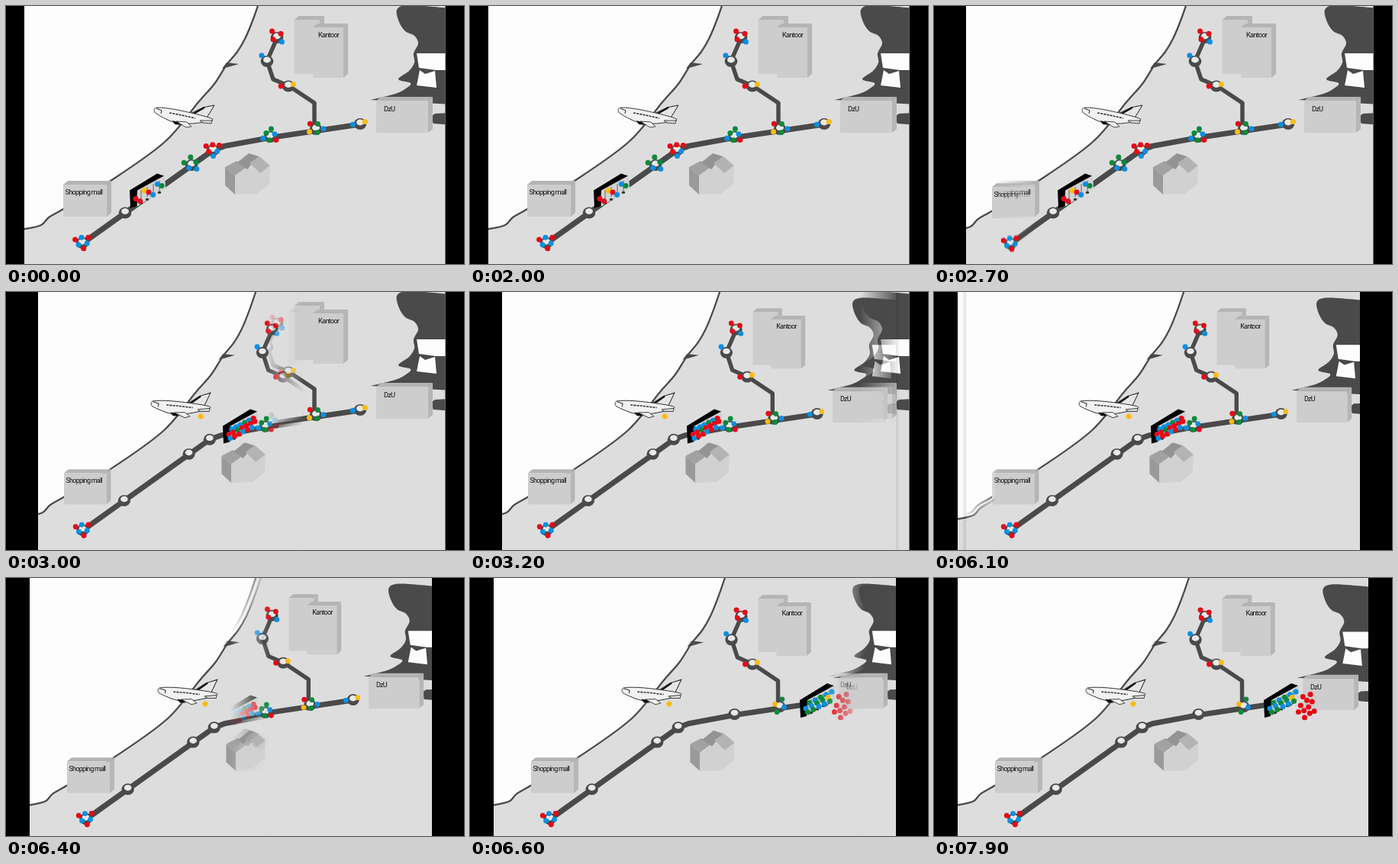
Animation of 600x338 px, one loop 8 s. Source, as an HTML page with a canvas:

```html
<!DOCTYPE html>
<html lang="nl">
<head>
<meta charset="utf-8">
<title>Tram map</title>
<style>
html, body { margin: 0; width: 100%; height: 100%; overflow: hidden; background: #000; }
canvas { display: block; width: 100%; height: 100%; }
</style>
</head>
<body>
<canvas id="stage" width="600" height="338"></canvas>
<script>
const W = 600, H = 338, LOOP = 8000, STEP = 100;
const DARK = '#4a4a4a', LAND = '#dddddd', SEA = '#fdfdfd';
const COLORS = { r: '#e30b17', b: '#0a90e0', g: '#0b8a3a', y: '#fcbc0c' };
const stage = document.getElementById('stage').getContext('2d');

function layer() {
  const c = document.createElement('canvas');
  c.width = W;
  c.height = H;
  return c.getContext('2d');
}

// "x,y x,y ..." to a list of points
const points = s => s.split(' ').map(p => p.split(',').map(Number));

function trace(g, s) {
  g.beginPath();
  points(s).forEach(([x, y]) => g.lineTo(x, y));
}

// Smooth curve through every point
function curve(g, s) {
  const p = points(s);
  const at = i => p[Math.max(0, Math.min(p.length - 1, i))];
  const slope = (i, k) => (at(i + 1)[k] - at(i - 1)[k]) / 6;
  g.beginPath();
  g.moveTo(...p[0]);
  for (let i = 1; i < p.length; i++) {
    const a = p[i - 1], b = p[i];
    g.bezierCurveTo(
      a[0] + slope(i - 1, 0), a[1] + slope(i - 1, 1),
      b[0] - slope(i, 0), b[1] - slope(i, 1), ...b);
  }
}

function fill(g, color) {
  g.fillStyle = color;
  g.fill();
}

function line(g, width, color = DARK) {
  g.strokeStyle = color;
  g.lineWidth = width;
  g.stroke();
}

function poly(g, s, color) {
  trace(g, s);
  g.closePath();
  fill(g, color);
}

function stroke(g, s, width, color) {
  trace(g, s);
  line(g, width, color);
}

function ellipse(g, x, y, rx, ry, color) {
  g.beginPath();
  g.ellipse(x, y, rx, ry, 0, 0, 7);
  fill(g, color);
}

const dot = (g, x, y, key) => ellipse(g, x, y, 3.5, 3.5, COLORS[key]);

// Passengers around a stop, alternately farther out and closer in
function waiting(g, x, y, keys, turn) {
  [...keys].forEach((key, i) => {
    const a = (turn + 360 * i / keys.length) * Math.PI / 180;
    const r = i % 2 ? 6.5 : 10;
    dot(g, x + r * Math.cos(a), y + r * Math.sin(a) * 0.9, key);
  });
}

// Passengers in three rows along the slanted side of the tram
function riding(g, keys) {
  [...keys].forEach((key, i) => {
    const x = 8 + 34 * i / (keys.length - 1);
    dot(g, x, 15 - x / 2 + [0, 6, -5][i % 3], key);
  });
}

// Passengers who have left the tram, spread as a sunflower
function crowd(g, x, y, count) {
  for (let i = 0; i < count; i++) {
    const r = Math.sqrt(i + 0.5), a = i * 2.4;
    dot(g, x + 3.7 * r * Math.cos(a), y + 5.6 * r * Math.sin(a), 'r');
  }
}

function box(g, x, y, w, h, d = 6) {
  const r = x + w, b = y + h, top = y - d + 1;
  poly(g, `${x},${y} ${x + d},${top} ${r + d},${top} ${r},${y}`, '#b4b4b4');
  poly(g, `${r},${y} ${r + d},${top} ${r + d},${b - d + 1} ${r},${b}`, '#b6b6b6');
  g.fillStyle = '#cdcdcd';
  g.fillRect(x, y, w, h);
}

function label(g, text, x, y) {
  g.font = '9.3px Roboto, "Open Sans", sans-serif';
  g.letterSpacing = '-0.8px';
  g.fillStyle = '#111';
  g.fillText(text, x, y);
}

function coast(g) {
  const shore = '-10,296 25,292 46,287 56,277 75,266 137,229 208,178 252,126 273,102 289,77 303,60 314,41 325,14 336,-18';
  g.fillStyle = LAND;
  g.fillRect(-30, -30, 700, 430);
  curve(g, shore);
  g.lineTo(-40, -18);
  g.lineTo(-40, 296);
  fill(g, SEA);
  curve(g, shore);
  line(g, 2.3);
  poly(g, '289,74 305,76 291,80 283,82', DARK);
}

function lake(g) {
  curve(g, '600,5 560,1 525,-1 512,5 515,21 523,33 535,39 540,49 534,62 535,74 528,85 514,96 530,101 524,108 510,115 478,123');
  g.lineTo(600, 130);
  fill(g, DARK);
  poly(g, '538,62 600,62 600,84 563,84 541,81', SEA);
  poly(g, '542,84 549,89 562,85 564,107 538,104', SEA);
  poly(g, '555,146 562,141 600,139 600,157 560,154', DARK);
}

function houses(g) {
  poly(g, '287,211 300,222 300,247 287,235', '#9a9a9a');
  poly(g, '287,211 302,203 315,212 300,222', '#a2a2a2');
  poly(g, '300,222 315,211 346,208 345,233 329,246 300,247', '#d1d1d1');
  poly(g, '303,205 318,193 331,197 316,214', '#939393');
  poly(g, '319,206 332,197 346,209 333,219', '#b3b3b3');
}

const STOPS = points('100,309 156,269.5 243,207 271,187.5 346,170 406,160 464,153 370,103.5 342,71 355,40');

function rails(g) {
  g.lineJoin = 'round';
  stroke(g, '355,42 342,72 350,96 371,105 404,127 404,160', 5.5);
  stroke(g, '100,311 243,209 271,189 286,183.5 346,172.5 464,155', 7.2);
  STOPS.forEach(([x, y]) => {
    ellipse(g, x, y + 1.5, 8.3, 7.6, DARK);
    ellipse(g, x, y - 0.5, 4.9, 3.9, '#e9e9e9');
  });
}

function plane(g, [x, y, turn]) {
  const part = (s, color, width) => {
    poly(g, s, color);
    line(g, width, '#222');
  };
  g.save();
  g.translate(x, y);
  g.rotate(turn);
  part('48,4 64,-4 79,-7 68,11', '#e6e6e6', 1);
  stroke(g, '50,5 66,-4', 2.2, '#111');
  curve(g, '0,-1 5,-4 30,-1 68,8 76,13 48,17 25,15 3,4 0,-1');
  fill(g, '#f1f1f1');
  line(g, 0.9, '#222');
  g.setLineDash([3, 1.2]);
  stroke(g, '20,3 36,6 54,10', 1.6, '#333');
  g.setLineDash([]);
  stroke(g, '3,-3 10,0 9,4', 1, '#222');
  part('60,13 76,13 75,17 64,16', '#ddd', 0.8);
  part('29,14 43,15 49,21 42,22', '#eee', 0.8);
  poly(g, '24,13 31,15 35,19 27,18', '#111');
  g.restore();
}

// Local origin is the upper front corner of the tram
function tram(g, [x, y], riders) {
  g.save();
  g.translate(x, y);
  poly(g, '10,0 46,-19 47,-2 10,21', '#d2d2d2');
  for (let u = 15; u < 45; u += 8) {
    stroke(g, `${u},${7 - u / 2} ${u},${20 - u / 2}`, 1, '#666');
    ellipse(g, u, 25 - u * 0.57, 2.2, 1.7, '#333');
  }
  poly(g, '0,0 36,-22 45,-19 10,0 9,21 1,23', '#000');
  riding(g, riders);
  g.restore();
}

function scene(s) {
  const g = layer();
  const [left, right] = s.bars;
  const [sx, sy, dx, dy] = s.view;
  g.fillStyle = '#000';
  g.fillRect(0, 0, W, H);
  g.beginPath();
  g.rect(left, 0, right - left, H);
  g.clip();
  g.save();
  g.transform(sx, 0, 0, sy, dx, dy);
  coast(g);
  lake(g);
  box(g, 377.5, 18, 33.5, 71);
  box(g, 402, 28, 40, 66);
  label(g, 'Kantoor', 409, 40.5);
  box(g, 75, 234, 57, 42);
  label(g, 'Shopping mall', 77.5, 247);
  box(g, 485, 124, 68, 42);
  label(g, 'DzU', 495, 138);
  houses(g);
  rails(g);
  s.stops.split(' ').forEach(entry => {
    const [stop, keys, turn] = entry.split(':');
    waiting(g, ...STOPS[stop], keys, +turn);
  });
  g.restore();
  plane(g, s.plane);
  tram(g, s.tram, s.riders);
  if (s.flyer) dot(g, ...s.flyer, 'y');
  if (s.crowd) crowd(g, ...s.crowd);
  return g.canvas;
}

// Waiting passengers as stop:colours:angle of the first one
const ends = '0:rbrbrb:200 9:rrbr:230 8:b:225 7:ry:170 ';
const east = '4:gbrgbg:278 5:rgbgy:220 6:by:165';

const scenes = [
  {
    bars: [24, 575.5], view: [1, 1, 0, 0], plane: [194, 137, 0],
    tram: [162, 241.5], riders: 'rryrbbg',
    stops: ends + '2:ggbbg:263 3:rrrbbr:207 ' + east
  },
  {
    bars: [42, 558], view: [0.9735, 0.977, 3, 8.6], plane: [190, 147, -0.1],
    tram: [284, 175.5], riders: 'rbbrrbgrbrbgrrbrbrr',
    stops: ends + east, flyer: [255, 163]
  },
  {
    bars: [31, 569], view: [0.9835, 0.987, 6.2, 9.3], plane: [199, 148, -0.1],
    tram: [432, 160], riders: 'bggbgbgbggbbygb',
    stops: ends + '5:gbgy:290', flyer: [261, 165], crowd: [488, 169, 11]
  }
].map(scene);

const mask = layer();

// Soft left-to-right wipe whose middle lies at x = mid
function wipe(from, to, mid) {
  const soft = mask.createLinearGradient(mid - 26, 0, mid + 26, 0);
  soft.addColorStop(0, '#000');
  soft.addColorStop(1, 'transparent');
  mask.globalCompositeOperation = 'copy';
  mask.drawImage(to, 0, 0);
  mask.globalCompositeOperation = 'destination-in';
  mask.fillStyle = soft;
  mask.fillRect(0, 0, W, H);
  stage.drawImage(from, 0, 0);
  stage.drawImage(mask.canvas, 0, 0);
}

function draw(now) {
  const t = Math.floor(now % LOOP / STEP) * STEP;
  const [first, second, third] = scenes;
  if (t < 2600) stage.drawImage(first, 0, 0);
  else if (t < 3300) wipe(first, second, 21 + (t - 2600) * 0.86);
  else if (t < 6000) stage.drawImage(second, 0, 0);
  else if (t < 6800) wipe(second, third, (t - 6000) * 0.86 - 24);
  else stage.drawImage(third, 0, 0);
}

const start = performance.now();
function tick() {
  draw(performance.now() - start);
  requestAnimationFrame(tick);
}
tick();
</script>
</body>
</html>
```
